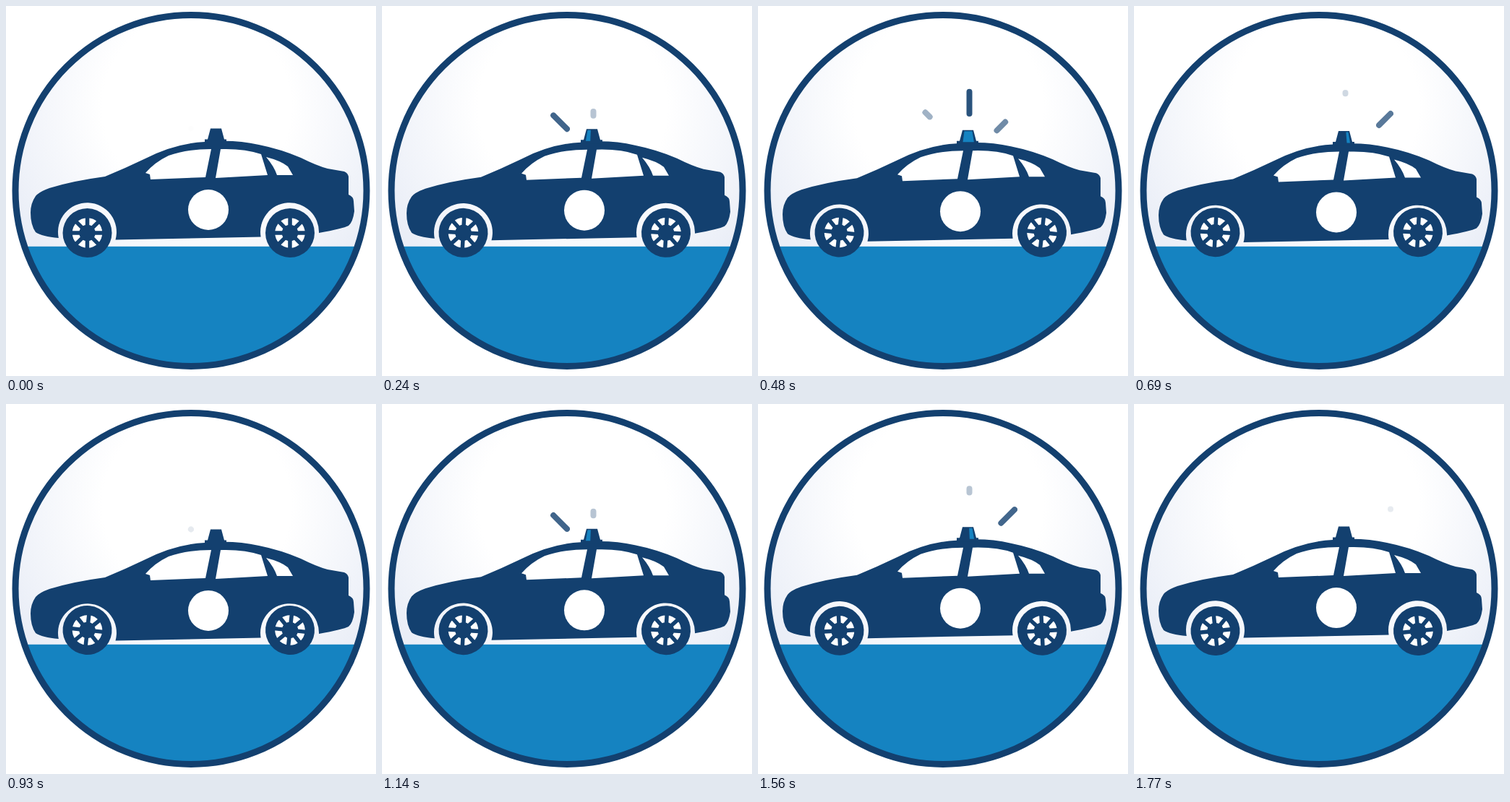
An HTML page that plays this animation: 512x512 px, repeating every 1800 ms.

```html
<!DOCTYPE html>
<html lang="en">
<head>
<meta charset="utf-8">
<title>Taxi badge</title>
<style>
  html, body { margin: 0; height: 100%; overflow: hidden; background: #fff; }
  svg { display: block; width: 100vw; height: 100vh; }
  .navy { fill: #13406f; }
  .ray { stroke: #13406f; stroke-width: 8; stroke-linecap: round; }
</style>
</head>
<body>
<svg viewBox="0 0 512 512">
  <defs>
    <radialGradient id="sky" gradientUnits="userSpaceOnUse" cx="264" cy="140" r="290">
      <stop offset=".45" stop-color="#fff"/>
      <stop offset="1" stop-color="#eaeef7"/>
    </radialGradient>
    <clipPath id="disc"><circle cx="256" cy="255.5" r="244"/></clipPath>
    <g id="wheel">
      <circle class="navy" r="34"/>
      <circle r="16" fill="none" stroke="#fff" stroke-width="9.5"/>
      <path d="M0-22V22M-22 0H22M-15.6-15.6 15.6 15.6M-15.6 15.6 15.6-15.6" stroke="#13406f" stroke-width="5.5"/>
    </g>
  </defs>
  <g clip-path="url(#disc)">
    <path d="M0 0H512V512H0Z" fill="url(#sky)"/>
    <path d="M0 332.7H512V512H0Z" fill="#1583c1"/>
  </g>
  <circle cx="256" cy="255.5" r="243" fill="none" stroke="#13406f" stroke-width="9"/>

  <g id="car">
    <g id="rays"></g>
    <path class="navy" d="M41 263Q46 257 60 252Q92 242 137 236Q166 224 193 211Q234 190 275 188Q315 184 350 192
      Q380 198 408 210Q430 221 445 225L468 229Q473 231 474 236L474 261Q481 264 481 270L482 284
      Q480 299 474 304Q466 308 433 314A40.5 40.5 0 1 0 352.6 319.5L151.5 323.5A40.5 40.5 0 1 0 72.8 321
      Q50 319 41 313Q34 303 34 286Q34 273 41 263Z"/>
    <path fill="#fff" d="M193 231Q206 216 225 207Q250 198 284 198L276 237 200 240 199 233Z
      M297 198Q330 197 353 205L362 234 290 238Z
      M360 209Q380 214 390 222L397 234 375 234Q371 222 360 209Z"/>
    <circle cx="280" cy="282" r="28" fill="#fff"/>
    <path class="navy" d="M283 169.5H298L302 184.5H305V190H275V184.5H279Z"/>
    <path id="lamp" fill="#1583c1"/>
  </g>
  <use href="#wheel" class="wheel"/>
  <use href="#wheel" class="wheel"/>
</svg>
<script>
  const $ = id => document.getElementById(id);
  const clamp = v => Math.min(1, Math.max(0, v));
  const rad = Math.PI / 180;
  const LOOP = 1800, SWEEP = 900;
  const wheels = [...document.querySelectorAll('.wheel')];

  // from/to: line ends; peak: time of full opacity; head/tail: [start, end] of each trim
  const rays = [
    { from: [256, 169.5], to: [231.5, 145], peak: 300, head: [30, 305], tail: [275, 550] },
    { from: [292.5, 151], to: [292.5, 116.5], peak: 450, head: [200, 450], tail: [450, 700] },
    { from: [330.5, 170], to: [355, 145.5], peak: 600, head: [350, 625], tail: [595, 870] }
  ];
  for (const ray of rays) {
    ray.el = document.createElementNS('http://www.w3.org/2000/svg', 'line');
    ray.el.setAttribute('class', 'ray');
    $('rays').append(ray.el);
  }

  function drawRay({ el, from, to, peak, head, tail }, t) {
    const point = ([start, end]) => {
      const k = clamp((t - start) / (end - start));
      return from.map((v, i) => v + (to[i] - v) * k);
    };
    const [x1, y1] = point(tail), [x2, y2] = point(head);
    Object.entries({ x1, y1, x2, y2 }).forEach(([k, v]) => el.setAttribute(k, v));
    el.setAttribute('opacity', clamp(1 - Math.abs(t - peak) / 300));
  }

  // A lit patch turning around the inside of the lamp
  function drawLamp(t) {
    const angle = (t / SWEEP - .5) * 360;
    const edge = a => Math.sin(Math.max(-90, Math.min(90, a)) * rad);
    const a = edge(angle - 68), b = edge(angle + 68);
    const at = (s, r, y) => `${290.5 + s * r} ${y}`;
    $('lamp').setAttribute('d', b - a < .01 ? '' :
      `M${at(a, 6, 171)}L${at(b, 6, 171)} ${at(b, 8.5, 186)} ${at(a, 8.5, 186)}Z`);
  }

  function draw(now) {
    const t = now % LOOP, turn = t / LOOP * 360;
    const bob = 2 * (1 - Math.cos(turn * rad));
    $('car').setAttribute('transform', `translate(0 ${bob})`);
    wheels.forEach((el, i) => el.setAttribute('transform',
      `translate(${i ? 393 : 112.5} ${314 - bob / 4}) rotate(${turn})`));
    rays.forEach(ray => drawRay(ray, t % SWEEP));
    drawLamp(t % SWEEP);
  }

  const start = performance.now();
  function tick() {
    draw(performance.now() - start);
    requestAnimationFrame(tick);
  }
  tick();
</script>
</body>
</html>
```
